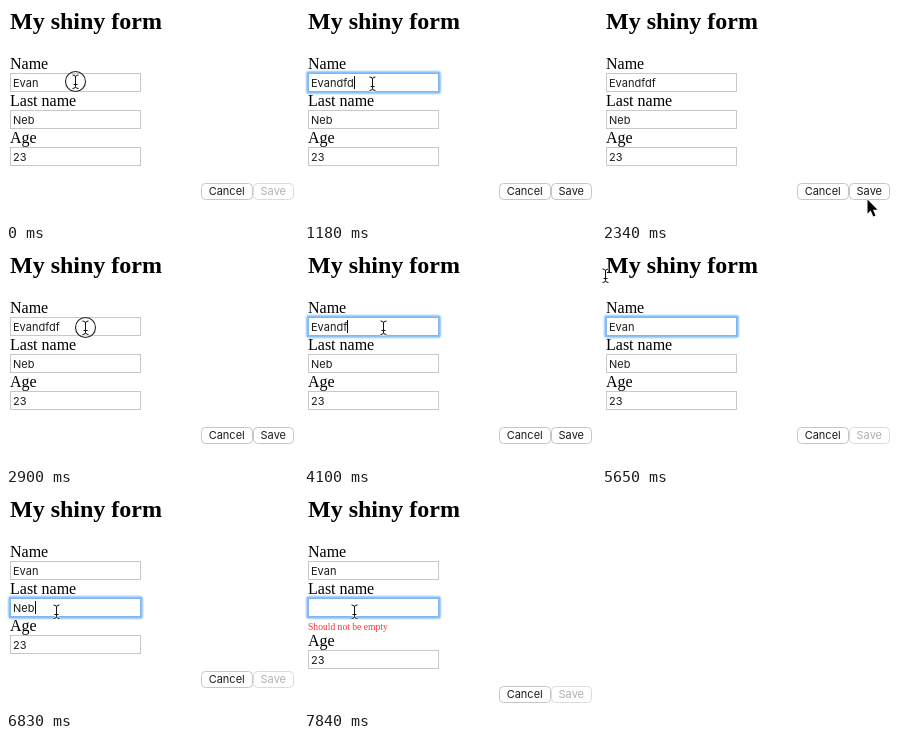
Animation, 292 px wide and 216 px high, one loop 8 s. Source, as an HTML page:

```html
<!DOCTYPE html>
<html lang="en">
<head>
<meta charset="utf-8">
<title>My shiny form</title>
<style>
  html, body { margin: 0; width: 100%; height: 100%; overflow: hidden; background: #fff; }
  svg { display: block; }
  text { font: 16px "Liberation Serif", serif; white-space: pre; }
  .title { font-size: 24px; font-weight: bold; }
  .error { font-size: 9.6px; fill: #f33; }
  .ui { font: 11px Inter, sans-serif; fill: #1c1c1c; }
  .mid { text-anchor: middle; }
  .field { fill: #fff; stroke: #c8c8c8; }
  .button { fill: #fff; stroke: #c6c6c6; }
  .ring { fill: none; stroke: #6fb2fb; }
  .off .button { stroke: #dcdcdc; }
  .off text { fill: #b0b0b0; }
</style>
</head>
<body>
<svg width="292" height="216" viewBox="0 0 292 216">
  <defs>
    <path id="beamShape" d="M-3-6.5Q0-6.5 0-4.5V5Q0 7-3 7M3-6.5Q0-6.5 0-4.5M0 5Q0 7 3 7M-2 3H2"/>
  </defs>

  <text class="title" x="4" y="23">My shiny form</text>

  <text x="4" y="63">Name</text>
  <rect class="field" x="4.5" y="67.5" width="130" height="18"/>
  <text class="ui" id="first" x="7" y="81"></text>

  <text x="4" y="100">Last name</text>
  <rect class="field" x="4.5" y="104.5" width="130" height="18"/>
  <text class="ui" id="last" x="7" y="118"></text>
  <text class="error" id="error" x="4" y="136">Should not be empty</text>

  <g id="lower">
    <text x="4" y="137">Age</text>
    <rect class="field" x="4.5" y="141.5" width="130" height="18"/>
    <text class="ui" x="7" y="155">23</text>
    <rect class="button" x="195.5" y="177.5" width="51" height="16" rx="4"/>
    <text class="ui mid" x="220.7" y="189">Cancel</text>
    <g id="save">
      <rect class="button" x="247.5" y="177.5" width="40" height="16" rx="4"/>
      <text class="ui mid" x="267.3" y="189">Save</text>
    </g>
  </g>

  <g id="ring" class="ring">
    <rect x="4" y="67" width="131" height="19" stroke-width="2" opacity=".8"/>
    <rect x="2.5" y="65.5" width="134" height="22" rx="2" opacity=".55"/>
    <rect x="1.5" y="64.5" width="136" height="24" rx="3" opacity=".2"/>
  </g>
  <rect id="caret" width="1" height="13"/>

  <g id="pointer">
    <circle id="press" r="10" fill="none" stroke="#222" stroke-width="1.1"/>
    <path id="arrow" d="M0 0V14L3.2 11L5.8 17L8 16L5.5 10.2H10Z" stroke="#fff" stroke-width="1.2" paint-order="stroke"/>
    <g id="beam" fill="none">
      <use href="#beamShape" stroke="#fff" stroke-width="2.6"/>
      <use href="#beamShape" stroke="#111" stroke-width="1"/>
    </g>
  </g>
</svg>
<script>
const LOOP = 8000, BLINK = 980, FADE = 60, PRESS = 110;
const el = id => document.getElementById(id);
const show = (id, on) => { el(id).style.display = on ? "" : "none"; };
const clamp = (v, max = 1) => Math.min(max, Math.max(0, v));
const ease = p => p * p * (3 - 2 * p);

const presses = [-50, 1990, 2840, 6230];
const focuses = [
  { id: "first", from: 360, to: 2040, blinkFrom: 80 },
  { id: "first", from: 2960, to: 6290, blinkFrom: 80 },
  { id: "last", from: 6290, to: LOOP + FADE, blinkFrom: 6350 },
];
const moves = [
  { at: 710, lasting: 290, x: 68, y: 78 },
  { at: 1290, lasting: 460, x: 270, y: 182 },
  { at: 2290, lasting: 550, x: 79, y: 78, dip: 50 },
  { at: 5450, lasting: 200, x: 3, y: 26 },
  { at: 5720, lasting: 380, x: 50, y: 111 },
  { at: 6130, lasting: 200, x: 50, y: 118 },
];

function pointerAt(t) {
  let x = 69, y = 76;
  for (const move of moves) {
    const p = clamp((t - move.at) / move.lasting), k = ease(p);
    x += (move.x - x) * k;
    y += (move.y - y) * k + (move.dip || 0) * Math.sin(Math.PI * p);
  }
  return [Math.round(x), Math.round(y)];
}

// Letters typed or erased so far: the first at `start`, then one per `gap`.
const keys = (t, start, gap, max) => clamp(Math.floor((t - start) / gap) + 1, max);

function extraLetters(t) {
  // Erasing slows down towards the last letter.
  const erased = t < 3920 ? 0 : clamp(1 + Math.floor(3 * ((t - 3920) / 840) ** .58), 4);
  return "dfdf".slice(0, keys(t, 710, 190, 4) - erased);
}

function drawFocus(t) {
  const focus = focuses.find(({ from, to }) => t >= from && t < to);
  show("ring", focus);
  show("caret", focus && (t - focus.blinkFrom + BLINK) % BLINK < BLINK / 2);
  if (!focus) return;

  const shift = focus.id === "last" ? 37 : 0, field = el(focus.id);
  const textWidth = field.textContent ? field.getComputedTextLength() : 0;
  el("ring").setAttribute("opacity", clamp(Math.min(t - focus.from + 20, focus.to - t) / FADE));
  el("ring").setAttribute("transform", `translate(0 ${shift})`);
  el("caret").setAttribute("x", Math.floor(7.7 + textWidth));
  el("caret").setAttribute("y", 70 + shift);
}

function draw(t) {
  const extra = extraLetters(t);
  const last = "Neb".slice(0, 3 - keys(t, 7130, 175, 3));
  el("first").textContent = "Evan" + extra;
  el("last").textContent = last;
  drawFocus(t);

  const changed = extra !== "" || last !== "Neb";
  show("error", !last);
  el("lower").setAttribute("transform", `translate(0 ${last ? 0 : 15})`);
  el("save").setAttribute("class", changed && last ? "" : "off");

  const [x, y] = pointerAt(t), overButtons = x > 140;
  show("arrow", overButtons);
  show("beam", !overButtons);
  show("press", presses.some(start => t >= start && t < start + PRESS));
  el("pointer").setAttribute("transform", `translate(${x + .5} ${y - .5})`);
}

const begin = performance.now();
function tick() {
  draw((performance.now() - begin) % LOOP);
  requestAnimationFrame(tick);
}
tick();
</script>
</body>
</html>
```
